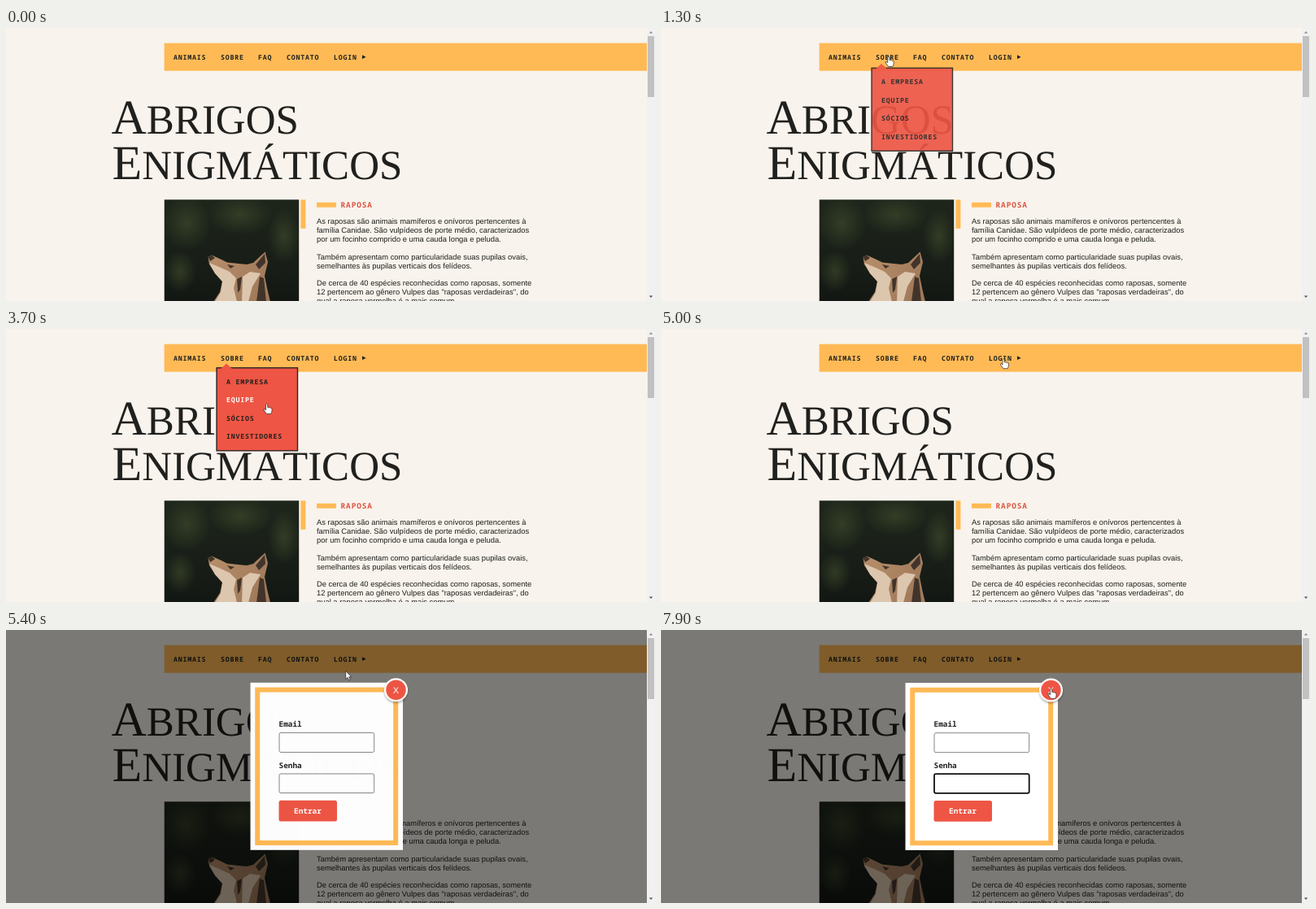
An HTML page for the animation above (8000 ms loop, 798 by 336 pixels).

```html
<!DOCTYPE html>
<html lang="pt-BR">
<head>
<meta charset="utf-8">
<title>Abrigos Enigmáticos</title>
<style>
  html, body { margin: 0; width: 100%; height: 100%; overflow: hidden; background: #f8f3ec; }
  svg { display: block; width: 798px; height: 336px; }
  text { fill: #20201e; text-rendering: geometricPrecision; white-space: pre; }
  .mono { font: 700 9.4px "Noto Sans Mono", "DejaVu Sans Mono", monospace; }
  .nav { font-size: 8.225px; letter-spacing: .1em; }
  .animal { letter-spacing: .1em; fill: #dd5440; }
  .body { font: 9.4px "Liberation Sans", Arial, sans-serif; }
  .title { font: 60px "Liberation Serif", "Times New Roman", serif; }
  .small { font-size: 51px; }
  .active { fill: #fff; }
  .white { fill: #fff; }
  .red { fill: #ee5544; }
  .gold { fill: #ffba55; }
  .field { fill: #fff; stroke: #858585; stroke-width: 1; }
  .field.focus { stroke: #101010; stroke-width: 1.8; }
</style>
</head>
<body>
<svg viewBox="0 0 798 336" xmlns="http://www.w3.org/2000/svg">
  <defs>
    <linearGradient id="forest" x2="0" y2="1">
      <stop offset="0" stop-color="#1e251b"/>
      <stop offset=".55" stop-color="#191f18"/>
      <stop offset="1" stop-color="#131713"/>
    </linearGradient>
    <radialGradient id="leaf">
      <stop offset="0" stop-color="#46522f" stop-opacity=".55"/>
      <stop offset="1" stop-color="#46522f" stop-opacity="0"/>
    </radialGradient>
    <linearGradient id="fur" x2="1" y2=".5">
      <stop offset="0" stop-color="#b98f6c"/>
      <stop offset="1" stop-color="#a07a5a"/>
    </linearGradient>
    <filter id="soft" x="-50%" y="-50%" width="200%" height="200%">
      <feGaussianBlur stdDeviation="1.6"/>
    </filter>
    <clipPath id="frame"><rect x="194.700" y="211.200" width="165.500" height="125"/></clipPath>
  </defs>

  <rect width="798" height="336" fill="#f8f3ec"/>
  <rect class="gold" x="194.600" y="18.600" width="593.400" height="34.100"/>
  <g id="menu" class="mono"></g>
  <path d="M438 33.300l4.600 2.400l-4.600 2.400z" fill="#20201e"/>

  <text class="title" x="129.500" y="129.500">A<tspan class="small">BRIGOS</tspan></text>
  <text class="title" x="130.500" y="185.700">E<tspan class="small">NIGMÁTICOS</tspan></text>

  <g clip-path="url(#frame)">
    <rect x="194" y="211" width="167" height="126" fill="url(#forest)"/>
    <g fill="url(#leaf)">
      <ellipse cx="222" cy="240" rx="30" ry="34"/>
      <ellipse cx="288" cy="230" rx="40" ry="24"/>
      <ellipse cx="342" cy="256" rx="20" ry="34"/>
      <ellipse cx="214" cy="300" rx="20" ry="26"/>
    </g>
    <path fill="url(#fur)" d="M248.500 282L253 279.500L265 285L272 288.500L286 290L296 291L304 289L318.500 275.500L322 288L318 305L321 320L325 337H255L263 325L266 312L257 302L250 291z"/>
    <path fill="#dcc6ae" d="M250 289L262 294L275 300L283 308L280 320L284 337H257L264 325L266 312L257 302zM291 306L300 300L313 302L303 318L298 337H290z"/>
    <path fill="#42342b" d="M248.500 282L253 279.500L257 283L251 287zM307 291L318 278L319 289L311 297zM272 291L281 293L276 296zM284 309L290 306L288 322L285 326zM312 306L317 308L320 337H308z"/>
  </g>
  <rect class="gold" x="362.400" y="211.300" width="6" height="35.500"/>
  <rect class="gold" x="382" y="214.700" width="24" height="6"/>
  <text class="mono animal" x="411.500" y="221">RAPOSA</text>
  <g id="copy" class="body"></g>

  <g id="drop">
    <rect class="red" x="259" y="47.800" width="99.500" height="102" stroke="#2b2425" stroke-width="1.400"/>
    <path class="red" d="M264 49L271 42.500L278 49z"/>
    <g id="items" class="mono"></g>
  </g>

  <g id="shade">
    <rect width="788" height="336" fill="#000" opacity=".5"/>
    <g id="modal">
      <rect x="300.500" y="65" width="187.500" height="206" fill="#fff"/>
      <rect x="309.200" y="73.800" width="170" height="188.400" fill="none" stroke="#ffba55" stroke-width="6"/>
      <text class="mono" x="335.500" y="119.300">Email</text>
      <rect id="email" class="field" x="336" y="126.700" width="116.700" height="24" rx="2"/>
      <text class="mono" x="335.500" y="169.900">Senha</text>
      <rect id="pass" class="field" x="336" y="177.200" width="116.700" height="23.600" rx="2"/>
      <path id="caret" stroke="#333" stroke-width=".8"/>
      <rect class="red" x="335.500" y="210" width="71.500" height="25.700" rx="2.500"/>
      <text class="mono white" x="354" y="226.300">Entrar</text>
      <circle cx="479.500" cy="76" r="14" filter="url(#soft)" opacity=".35"/>
      <circle class="red" cx="479.500" cy="74" r="13.400" stroke="#fff" stroke-width="2.300"/>
      <text class="body white" x="479.500" y="78.300" text-anchor="middle" style="font-size:11px">X</text>
    </g>
  </g>

  <rect x="788" width="10" height="336" fill="#f1f1f1"/>
  <rect x="789" y="10" width="8" height="75" fill="#c1c1c1"/>
  <path d="M790.800 6.500L793 4L795.200 6.500z" fill="#888"/>
  <path d="M790.800 329.500L793 332L795.200 329.500z" fill="#505050"/>

  <g id="cursor" fill="#fff" stroke="#222" stroke-width=".7" stroke-linejoin="round">
    <path id="arrow" d="M0 0V10L2.300 8L3.900 11.500L5.500 10.800L4 7.400H7z"/>
    <path id="hand" d="M-1 1Q0-.6 1.200 1V4.600L2 4.200L3 5L4 4.500L5 5.400Q6.600 5 6.500 6.500V9Q6 10.500 5.300 12.500H0L-3.400 8Q-4 6.300-2.400 6.500L-1 7.800z"/>
  </g>
</svg>
<script>
const LOOP = 8000;
const $ = id => document.getElementById(id);

function addText(parent, str, x, y, cls) {
  const el = document.createElementNS('http://www.w3.org/2000/svg', 'text');
  el.setAttribute('x', x);
  el.setAttribute('y', y);
  if (cls) el.setAttribute('class', cls);
  el.textContent = str;
  $(parent).append(el);
  return el;
}

[['ANIMAIS', 206], ['SOBRE', 264], ['FAQ', 310], ['CONTATO', 345], ['LOGIN', 403]]
  .forEach(([word, x]) => addText('menu', word, x, 38.6, 'nav'));

const paragraphs = [
  ['As raposas são animais mamíferos e onívoros pertencentes à',
   'família Canidae. São vulpídeos de porte médio, caracterizados',
   'por um focinho comprido e uma cauda longa e peluda.'],
  ['Também apresentam como particularidade suas pupilas ovais,',
   'semelhantes às pupilas verticais dos felídeos.'],
  ['De cerca de 40 espécies reconhecidas como raposas, somente',
   '12 pertencem ao gênero Vulpes das "raposas verdadeiras", do',
   'qual a raposa vermelha é a mais comum.']
];
let lineY = 241.1;
for (const lines of paragraphs) {
  for (const line of lines) {
    addText('copy', line, 382, lineY);
    lineY += 11.1;
  }
  lineY += 10.1;
}

const rowY = i => 65 + 22.4 * i;
const items = ['A EMPRESA', 'EQUIPE', 'SÓCIOS', 'INVESTIDORES']
  .map((word, i) => addText('items', word, 271, rowY(i) + 3, 'nav'));

// Pointer path: time, x, y, shape from here on
const path = [
  [100, 600, 312, 'arrow'], [600, 235, 37, 'hand'], [900, 235, 37, 'hand'],
  [1300, 279.7, 35, 'hand'], [1600, 281, 36, 'hand'], [1900, 281, 36, 'hand'],
  [2200, 300, 66, 'hand'], [2500, 300, 66, 'hand'], [2800, 306, 110, 'hand'],
  [3050, 310, 132, 'hand'], [3300, 316, 113, 'hand'], [3600, 320, 92, 'hand'],
  [3800, 321, 92, 'hand'], [4000, 368, 82, 'arrow'], [4200, 386, 36, 'hand'],
  [4500, 320, 36, 'hand'], [4900, 421, 36.5, 'hand'], [5100, 421, 36, 'arrow'],
  [5300, 421, 36, 'arrow'], [5700, 400, 128, 'none'], [7000, 430, 172, 'arrow'],
  [7600, 476, 75, 'hand'], [7900, 479.5, 72, 'hand']
];

const clamp = v => Math.min(1, Math.max(0, v));
const easeOut = u => 1 - (1 - clamp(u)) ** 3;
const smooth = u => u * u * (3 - 2 * u);
const show = (el, on) => { el.style.display = on ? '' : 'none'; };

function pointer(t) {
  if (t < path[0][0]) return { x: 0, y: 0, kind: 'none' };
  let i = 0;
  while (i < path.length - 1 && path[i + 1][0] <= t) i++;
  const a = path[i], b = path[i + 1] || a;
  const u = a === b ? 0 : smooth((t - a[0]) / (b[0] - a[0]));
  return { x: a[1] + (b[1] - a[1]) * u, y: a[2] + (b[2] - a[2]) * u, kind: a[3] };
}

function reveal(el, p, dy) {
  el.setAttribute('opacity', p);
  el.setAttribute('transform', `translate(0 ${dy * (1 - p)})`);
}

function draw(t) {
  const p = pointer(t);
  const dropOpen = t >= 1150 && t < 4000;
  show($('drop'), dropOpen);
  reveal($('drop'), easeOut((t - 1132) / 300), 17.6);
  items.forEach((el, i) => {
    const over = dropOpen && t > 1900 && Math.abs(p.y - rowY(i)) < 11.2;
    el.classList.toggle('active', over);
  });

  show($('shade'), t >= 5200);
  reveal($('modal'), easeOut((t - 5170) / 300), -17.6);
  const inEmail = t >= 6500 && t < 6900, inPass = t >= 6900;
  $('email').classList.toggle('focus', inEmail);
  $('pass').classList.toggle('focus', inPass);
  $('caret').setAttribute('d', `M341.500 ${inPass ? 184.5 : 134.5}v9`);
  show($('caret'), inEmail || (inPass && t < 7400));

  show($('arrow'), p.kind === 'arrow');
  show($('hand'), p.kind === 'hand');
  $('cursor').setAttribute('transform', `translate(${p.x} ${p.y})`);
}

const start = performance.now();
function tick(now) {
  draw(Math.floor(Math.max(0, now - start) % LOOP / 100) * 100);
  requestAnimationFrame(tick);
}
draw(0);
requestAnimationFrame(tick);
</script>
</body>
</html>
```
